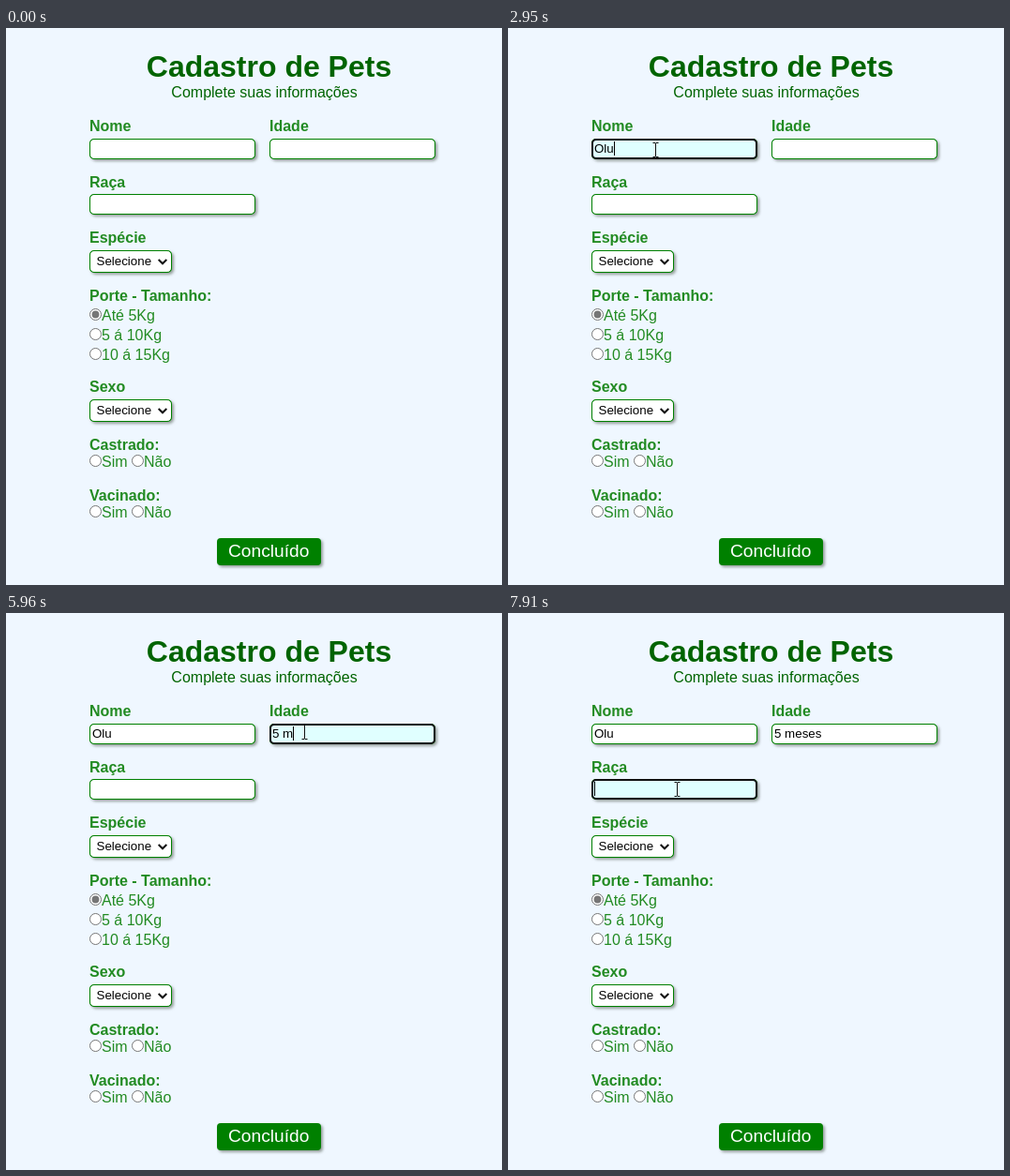
Recreate the animation shown at these times as an HTML page. Size 529 by 594 pixels, loop 8 s.

```html
<!DOCTYPE html>
<html lang="pt-BR">
<head>
<meta charset="utf-8">
<title>Cadastro de Pets</title>
<style>
html, body { margin: 0; width: 100%; height: 100%; overflow: hidden; background: #eff7ff; }
svg { display: block; width: 529px; height: 594px; font-family: "Liberation Sans", Arial, sans-serif; }
text { white-space: pre; }
.title { font: bold 32px "Liberation Sans", Arial, sans-serif; fill: #006400; text-anchor: middle; }
.sub { font-size: 16px; fill: #006400; text-anchor: middle; }
.label { font-size: 16px; font-weight: bold; fill: #228b22; }
.option { font-size: 16px; fill: #228b22; }
.value { font-size: 13.333px; fill: #000; }
.button { font-size: 19.2px; fill: #fff; text-anchor: middle; }
.box { fill: #fff; stroke: #008000; }
.shadow { filter: drop-shadow(2px 2px 1.5px rgba(90, 100, 90, .6)); }
.focus { fill: #e0ffff; stroke: #101010; stroke-width: 2; }
</style>
</head>
<body>
<svg id="stage" viewBox="0 0 529 594"></svg>
<script>
const stage = document.getElementById('stage');

function add(tag, attrs, content = '') {
  const el = document.createElementNS('http://www.w3.org/2000/svg', tag);
  for (const key in attrs) el.setAttribute(key, attrs[key]);
  el.textContent = content;
  return stage.appendChild(el);
}
const text = (cls, x, y, content) => add('text', { class: cls, x, y }, content);
const box = (x, y, width, height) => {
  add('rect', { class: 'shadow', x, y, width, height, rx: 5, fill: '#008000' });
  add('rect', { class: 'box', x: x + .5, y: y + .5, width: width - 1, height: height - 1, rx: 4.5 });
};

function field(x, y) {
  box(x, y, 177, 22);
  return {
    x, y,
    focus: add('rect', { class: 'focus', x: x + 1, y: y + 1, width: 175, height: 20, rx: 4 }),
    value: text('value', x + 3, y + 15, '')
  };
}

function select(y) {
  box(89, y, 88, 24);
  text('value', 96.5, y + 16, 'Selecione');
  add('path', { d: `M162.7 ${y + 10}l4.3 4.3l4.3-4.3`, fill: 'none', stroke: '#111', 'stroke-width': 2 });
}

function radio(x, baseline, label, on) {
  const cx = x + 6.5, cy = baseline - 6.5;
  add('circle', { cx, cy, r: 6, fill: '#fff', stroke: '#767676' });
  if (on) add('circle', { cx, cy, r: 3.9, fill: '#767676' });
  text('option', x + 13, baseline, label);
}

text('title', 280.5, 52, 'Cadastro de Pets');
text('sub', 275.5, 74, 'Complete suas informações');
[[89, 110, 'Nome'], [281, 110, 'Idade'], [89, 170, 'Raça'], [89, 229, 'Espécie'],
 [89, 291, 'Porte - Tamanho:'], [89, 388, 'Sexo'], [89, 450, 'Castrado:'], [89, 504, 'Vacinado:']
].forEach(row => text('label', ...row));

const name = field(89, 118), age = field(281, 118), breed = field(89, 177);
const fields = [name, age, breed];
select(237);
select(396);
radio(89, 312, 'Até 5Kg', true);
radio(89, 333, '5 á 10Kg');
radio(89, 354, '10 á 15Kg');
for (const y of [468, 522]) {
  radio(89, y, 'Sim');
  radio(134, y, 'Não');
}
add('rect', { class: 'shadow', x: 225, y: 544, width: 111, height: 29, rx: 4, fill: '#008000' });
text('button', 280.2, 564, 'Concluído');

const caret = add('rect', { width: 1, height: 15, fill: '#000' });
const glow = add('circle', { r: 12, fill: '#fff250', 'fill-opacity': .85, style: 'mix-blend-mode:multiply' });
const beam = add('path', { d: 'M-3-7.5h2.5l.5.5l.5-.5H3M0-7V7M-3 7.5h2.5L0 7l.5.5H3', fill: 'none', stroke: '#111' });
const arrow = add('path', { d: 'M0 0V16l3.7-3.5l2.4 5.6l2.5-1.1l-2.4-5.4h5z', fill: '#fff', stroke: '#000', 'stroke-width': .9 });

const STEP = 70;
const moves = [
  { start: 650, path: [[650, 520, 578], [790, 490, 495], [1070, 275, 257], [1140, 238, 232], [1210, 180, 169], [1350, 157, 130]] },
  { start: 3480, path: [[3550, 157, 130], [3690, 190, 127], [3830, 270, 125], [3970, 318, 127]] },
  { start: 7220, path: [[7220, 318, 127], [7360, 285, 143], [7500, 213, 178], [7640, 180, 188]] }
];
const clicks = [[1550, 1620, name], [4040, 4150, age], [7780, 7910, breed]];
const typing = [
  [name, 'Olu', [2480, 2680, 2950]],
  [age, '5 meses', [4900, 5630, 5960, 6160, 6360, 6560, 6760]]
];

function pointer(t) {
  const move = moves.filter(m => t >= m.start).pop();
  if (!move) return null;
  const { start, path } = move;
  const q = start + Math.floor((t - start) / STEP) * STEP;
  if (q <= path[0][0]) return path[0].slice(1);
  const i = path.findIndex(p => p[0] >= q);
  if (i < 0) return path[path.length - 1].slice(1);
  const [t0, x0, y0] = path[i - 1], [t1, x1, y1] = path[i];
  const k = (q - t0) / (t1 - t0);
  return [Math.round(x0 + (x1 - x0) * k), Math.round(y0 + (y1 - y0) * k)];
}

const show = (el, on) => el.setAttribute('visibility', on ? 'visible' : 'hidden');
const place = (el, x, y) => el.setAttribute('transform', `translate(${x} ${y})`);

function draw(t) {
  const click = clicks.filter(c => t >= c[0]).pop();
  const active = click && click[2];
  let lastInput = click ? click[0] : 0;

  fields.forEach(f => show(f.focus, f === active));
  for (const [f, word, times] of typing) {
    const typed = times.filter(k => t >= k);
    const value = word.slice(0, typed.length);
    if (f.value.textContent !== value) f.value.textContent = value;
    if (f === active && typed.length) lastInput = typed[typed.length - 1];
  }

  // The caret blinks every 530 ms after the last key or click.
  show(caret, active && t - lastInput < 530);
  if (active) {
    const count = active.value.textContent.length;
    const width = count ? active.value.getComputedTextLength() : 0;
    place(caret, Math.round(active.x + 3 + width), active.y + 3);
  }

  const at = pointer(t);
  const inside = at && fields.some(f =>
    at[0] >= f.x && at[0] < f.x + 177 && at[1] >= f.y && at[1] < f.y + 22);
  show(beam, inside);
  show(arrow, at && !inside);
  show(glow, click && t < click[1]);
  if (at) {
    place(beam, at[0] + .5, at[1]);
    place(arrow, at[0] + .5, at[1] + .5);
    place(glow, at[0] - 2, at[1] - 1);
  }
}

const begin = performance.now();
function tick() {
  draw((performance.now() - begin) % 8000);
  requestAnimationFrame(tick);
}
tick();
</script>
</body>
</html>
```
